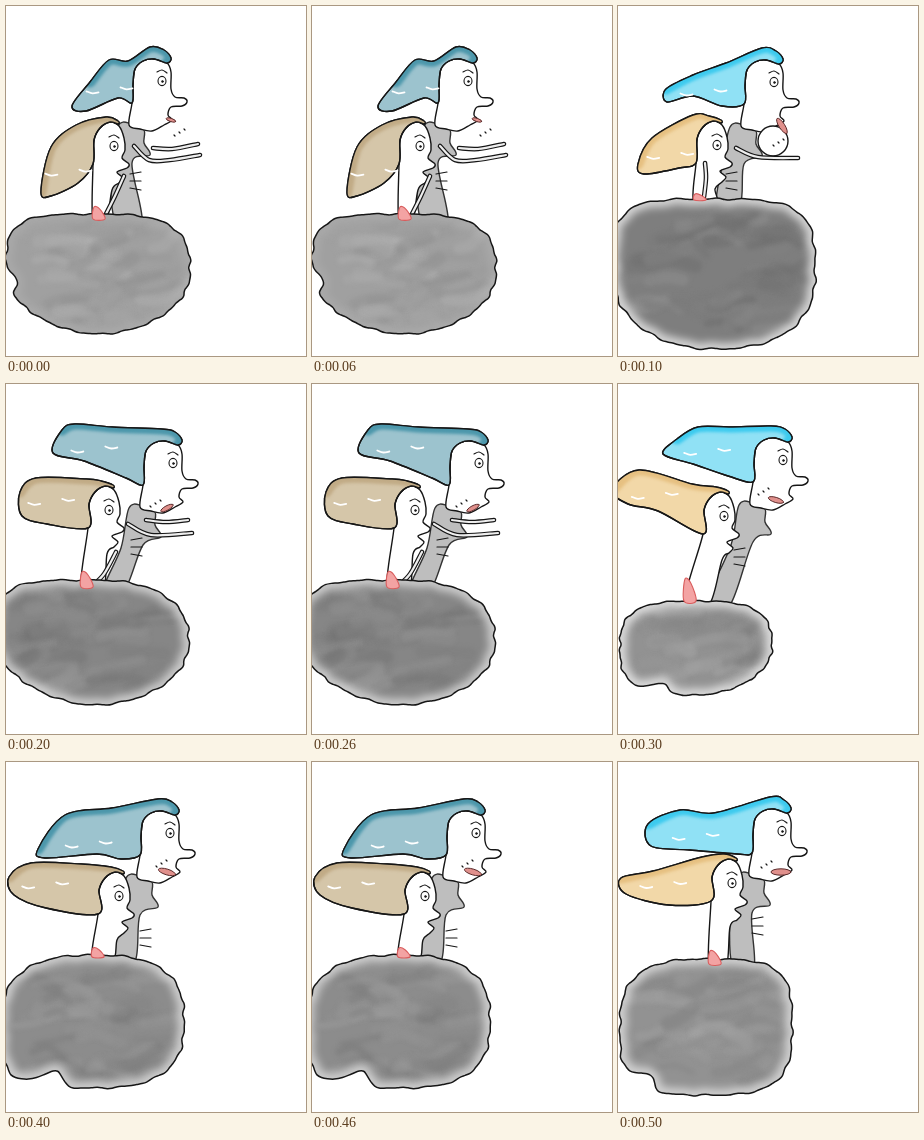
An HTML page with a canvas for the animation above (0.6 s loop, 300 by 350 pixels).

```html
<!DOCTYPE html>
<html lang="en">
<head>
<meta charset="utf-8">
<title>Two women on a cloud</title>
<style>
html, body { margin: 0; width: 100%; height: 100%; overflow: hidden; background: #fff; }
canvas { display: block; }
</style>
</head>
<body>
<canvas id="stage" width="300" height="350"></canvas>
<script>
const ctx = document.getElementById('stage').getContext('2d');
const STEP = 100, INK = '#161616';
const MUTED = { blue: ['#9cc3ce', '#4c97ab'], tan: ['#d5c6a9', '#c1ab86'] };
const BRIGHT = { blue: ['#90e1f5', '#3dcaee'], tan: ['#f2d8a8', '#e6c081'] };

// Shared shapes, measured from the eye of each head.
const BACK = {
  line: '-8,-22 -19,-20 -27,-12 -29,3 -30,22',
  face: '-33,44 -22,48 -10,50 2,44 10,39 6,34 9,26 20,25 25,21 22,17 13,16 9,8 9,-9 5,-18',
  crown: '-12,-34 2,-31 9,-23 5,-18',
  body: '-52,85 -44,45 -30,43 -18,49 -18,62 -12,74 -30,82'
};
const FRONT = {
  line: '-4,-24 -14,-18 -20,-6 -21,18',
  face: '-2,44 5,37 9,32 3,26 13,22 15,18 8,12 11,4 10,-8 5,-20',
  crown: '-8,-29 4,-25 4,-22'
};

// box: left, top, right, bottom; round: corner exponents; dent: angle, depth.
// back and front are eye positions, waist and neck are spans on the cloud.
const poses = [
  {
    box: [0, 208, 184, 328], round: [4, 3, 1.9, 1.8], dent: [3.03, 0.12], tone: 160, rim: 0.1,
    back: [156, 75], backTail: '112,92 80,105 66,100 84,76 103,54 122,55', waist: [110, 136],
    front: [108, 140], frontTail: '72,177 45,190 35,186 45,141 70,119', neck: [87, 100], base: 213,
    red: 12, mouth: [165, 114, 5, 0.3], dots: [173, 126], ticks: [124, 175],
    arms: ['147,142 166,143 192,138', '128,140 143,154 164,154 194,149', '118,170 109,190 100,208']
  },
  {
    box: [-5, 193, 197, 343], round: [4.2, 3.7, 2.4, 2.1], tone: 126, rim: 0.7,
    back: [156, 76], backTail: '104,100 75,90 49,96 48,83 75,69 108,57', waist: [99, 122],
    front: [99, 139], frontTail: '61,162 26,168 20,158 34,132 75,109', neck: [76, 99], base: 194,
    red: 6, mouth: [164, 120, 9, 1], dots: [160, 136], ticks: [108, 175], breast: [155, 135, 15],
    arms: ['118,142 140,151 180,152', '87,157 88,172 86,191']
  },
  {
    box: [-11, 196, 183, 321], round: [4, 2.4, 2, 1.7], tone: 134, rim: 0.6,
    back: [167, 79], backTail: '120,94 78,77 47,69 56,46 69,40 106,43', waist: [97, 118],
    front: [103, 126], frontTail: '41,140 16,132 14,108 30,94 80,95', neck: [75, 97], base: 203,
    red: 15, mouth: [161, 124, 7, -0.5], dots: [149, 119], ticks: [125, 163],
    arms: ['140,136 160,138 182,136', '122,140 145,151 186,149', '110,168 98,190 86,202']
  },
  {
    box: [2, 217, 154, 311], round: [3, 3, 1.9, 3], dent: [2.09, 0.23], tone: 146, rim: 0.7,
    back: [165, 76], backTail: '110,92 75,80 45,70 59,55 80,43 112,43', waist: [88, 112],
    front: [106, 132], frontTail: '40,127 10,120 -6,106 21,86 74,100', neck: [66, 91], base: 217,
    red: 22, mouth: [158, 116, 8, 0.3], dots: [145, 107], ticks: [116, 173], arms: []
  },
  {
    box: [-5, 193, 178, 326], round: [2.5, 2.7, 2.7, 4], dent: [2.06, 0.28], tone: 140, rim: 0.6,
    back: [164, 71], backTail: '115,97 91,92 39,96 32,87 59,53 106,46', waist: [105, 129],
    front: [113, 134], frontTail: '40,146 8,133 3,115 25,101 75,102', neck: [86, 107], base: 195,
    red: 9, mouth: [161, 110, 9, 0.3], dots: [155, 101], ticks: [134, 176], arms: []
  },
  {
    box: [2, 197, 174, 333], round: [2.8, 3.6, 3.2, 3.4], dent: [2.32, 0.2], tone: 146, rim: 0.6,
    back: [164, 69], backTail: '119,92 72,88 33,84 30,62 62,48 96,51', waist: [115, 136],
    front: [114, 121], frontTail: '51,143 8,132 3,116 35,109 84,95', neck: [91, 108], base: 202,
    red: 13, mouth: [163, 110, 10, 0], dots: [148, 102], ticks: [134, 164], arms: []
  }
];

const points = (s, [x, y] = [0, 0]) => s.split(' ').map(p => {
  const [px, py] = p.split(',').map(Number);
  return [px + x, py + y];
});

function randomFrom(seed) {
  return () => (seed = seed * 16807 % 2147483647) / 2147483647;
}

function smooth(pts, closed = true) {
  const n = pts.length, path = new Path2D();
  const at = i => closed ? pts[(i + n) % n] : pts[Math.max(0, Math.min(n - 1, i))];
  path.moveTo(...pts[0]);
  for (let i = 0; i < n - (closed ? 0 : 1); i++) {
    const [a, b, c, d] = [at(i - 1), at(i), at(i + 1), at(i + 2)];
    path.bezierCurveTo(b[0] + (c[0] - a[0]) / 6, b[1] + (c[1] - a[1]) / 6,
      c[0] - (d[0] - b[0]) / 6, c[1] - (d[1] - b[1]) / 6, ...c);
  }
  if (closed) path.closePath();
  return path;
}

function stroke(path, color = INK, width = 1.4) {
  ctx.strokeStyle = color;
  ctx.lineWidth = width;
  ctx.stroke(path);
}

function shape(path, fill, line, width) {
  ctx.fillStyle = fill;
  ctx.fill(path);
  stroke(path, line, width);
}

function oval(x, y, rx, ry = rx, tilt = 0) {
  const path = new Path2D();
  path.ellipse(x, y, rx, ry, tilt, 0, 2 * Math.PI);
  return path;
}

function eye([x, y]) {
  shape(oval(x, y, 4, 4.6), '#fff', INK, 1.1);
  shape(oval(x + 0.5, y + 0.5, 1), INK, INK, 0.6);
  stroke(smooth(points('-5,-9 0,-11 5,-8', [x, y]), false), INK, 1.2);
}

// Hair runs along the hairline, round the tail and back over the crown.
function hair(head, tail, origin, [light, dark]) {
  const ends = points(tail), crown = points(head.crown, origin);
  const path = smooth([...points(head.line, origin), ...ends, ...crown]);
  shape(path, light);
  ctx.save();
  ctx.clip(path);
  ctx.filter = 'blur(1.5px)';
  stroke(smooth([...ends.slice(-3), ...crown], false), dark, 11);
  ctx.restore();
  stroke(path);
  const mid = i => ends.reduce((sum, p) => sum + p[i], 0) / ends.length;
  const [x, y] = [mid(0), mid(1)];
  for (const [dx, dy] of [[-8, 6], [26, 2]]) {
    stroke(smooth(points('-6,-1 0,1 6,0', [x + dx, y + dy]), false), '#fff', 1.8);
  }
}

function arm(s) {
  const path = smooth(points(s), false);
  stroke(path, INK, 4.6);
  stroke(path, '#eee', 2.2);
}

// Four rounded quarters with an optional notch and small seeded bumps.
function cloudPath({ box: [left, top, right, bottom], round, dent: [angle, depth] = [0, 0] }, rand) {
  const [cx, cy, rx, ry] = [(left + right) / 2, (top + bottom) / 2, (right - left) / 2, (bottom - top) / 2];
  const phase = [rand() * 6, rand() * 6], pts = [];
  for (let i = 0; i < 120; i++) {
    const t = i / 120 * 2 * Math.PI, c = Math.cos(t), s = Math.sin(t);
    const n = round[s < 0 ? (c < 0 ? 0 : 1) : (c < 0 ? 3 : 2)];
    const r = (Math.abs(c) ** n + Math.abs(s) ** n) ** (-1 / n)
      - depth * Math.exp(-(((t - angle) / 0.15) ** 2))
      + 0.009 * Math.sin(19 * t + phase[0]) + 0.006 * Math.sin(31 * t + phase[1]);
    pts.push([cx + rx * r * c, cy + ry * r * s]);
  }
  return smooth(pts);
}

function cloud(pose, seed) {
  const { box: [left, top, right, bottom], tone, rim } = pose;
  const rand = randomFrom(seed), path = cloudPath(pose, rand);
  const gray = (g, a = 1) => `rgba(${g},${g},${g},${a})`;
  ctx.save();
  ctx.clip(path);
  ctx.fillStyle = gray(tone);
  ctx.fill(path);
  ctx.filter = 'blur(2px)';
  for (let i = 0; i < 45; i++) {
    const x = left + (right - left) * (0.05 + rand() * 0.75);
    const y = top + (bottom - top) * (0.1 + rand() * 0.8);
    const run = 18 + rand() * 40, rise = (rand() - 0.65) * 28;
    const streak = smooth([[x, y], [x + run / 2, y - 6 * rand()], [x + run, y + rise]], false);
    stroke(streak, gray(Math.round(tone + (rand() - 0.5) * 50), 0.4), 6 + rand() * 8);
  }
  ctx.filter = 'blur(4px)';
  stroke(path, gray(255, rim), 12);
  ctx.restore();
  stroke(path, INK, 1.5);
}

function draw(index) {
  const p = poses[index], { blue, tan } = index % 2 ? BRIGHT : MUTED;
  const foot = p.base + 4;
  ctx.fillStyle = '#fff';
  ctx.fillRect(0, 0, 300, 350);
  ctx.lineCap = ctx.lineJoin = 'round';

  const waist = [[p.waist[1], foot], [p.waist[0], foot]];
  shape(smooth([...points(BACK.body, p.back), ...waist]), '#bebebe', '#333');
  shape(smooth([...points(BACK.line, p.back), ...points(BACK.face, p.back)]), '#fff');
  if (p.breast) shape(oval(...p.breast), '#fff');
  hair(BACK, p.backTail, p.back, blue);
  eye(p.back);
  const [mx, my, size, tilt] = p.mouth;
  shape(oval(mx, my, size, size * 0.32, tilt), '#e0908c', '#5a2a2a', 1);

  const neck = [[p.neck[0], foot], [p.neck[1], foot]];
  shape(smooth([...points(FRONT.line, p.front), ...neck, ...points(FRONT.face, p.front)]), '#fff');
  hair(FRONT, p.frontTail, p.front, tan);
  eye(p.front);
  p.arms.forEach(arm);

  const [tx, ty] = p.ticks, [dx, dy] = p.dots;
  for (const i of [-1, 0, 1]) {
    stroke(smooth([[tx, ty + i * 7], [tx + 11, ty + i * 9]], false), INK, 1.2);
    stroke(smooth([[dx + i * 5, dy - i * 3], [dx + i * 5 + 1, dy - i * 3 + 1]], false), INK, 1.2);
  }

  cloud(p, 71 + index * 977);
  const [x, y] = [p.neck[0], p.base];
  const patch = [[x, y], [x + 1, y - p.red], [x + 7, y - p.red * 0.8], [x + 12, y]];
  shape(smooth(patch), '#f3a3a3', '#d95c5c', 1.1);
}

let shown = -1;
function tick() {
  const index = Math.floor(performance.now() / STEP) % poses.length;
  if (index !== shown) draw(shown = index);
  requestAnimationFrame(tick);
}
tick();
</script>
</body>
</html>
```
